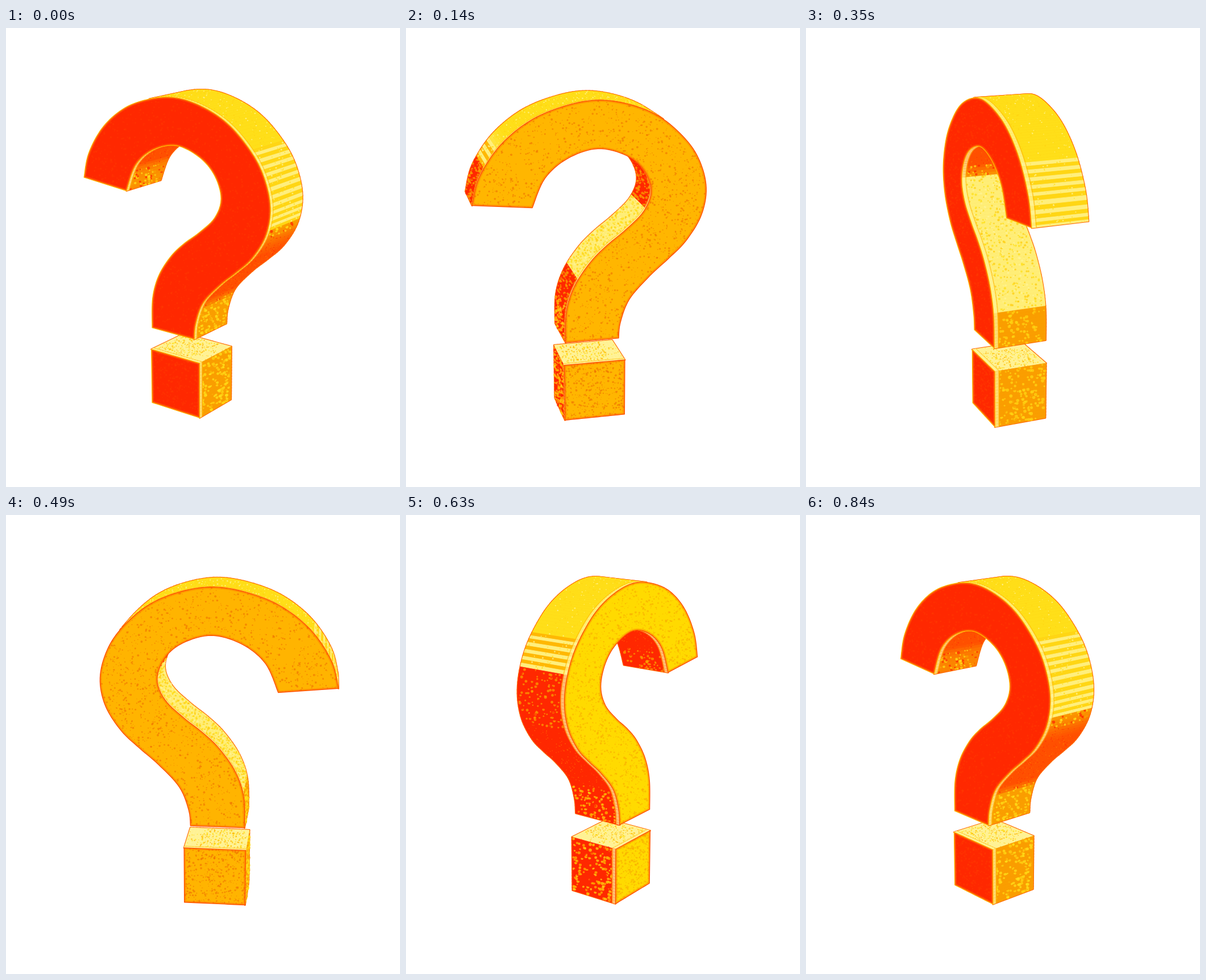
Write an HTML page with a canvas that moves like this. It is 693 px wide and 808 px high and loops after 910 ms.

```html
<!DOCTYPE html>
<html lang="en">
<head>
<meta charset="utf-8">
<title>Turning question mark</title>
<style>
html, body { margin: 0; width: 100%; height: 100%; overflow: hidden; background: #fff; }
canvas { display: block; }
</style>
</head>
<body>
<canvas id="stage" width="693" height="808"></canvas>
<script>
const ctx = document.getElementById('stage').getContext('2d');
const STEP = 70;
// Yaw in degrees for each step of the turn.
const YAWS = [-36.5, -14, 13, 51, 82, 112.5, 142, 174, 203.5, 234, 263.5, 289, 311];

const DIST = 2000, HALF = 48.5, PITCH = 17.5 * Math.PI / 180;
const SP = Math.sin(PITCH), CP = Math.cos(PITCH);

const RED = [255, 40, 0], EMBER = [255, 80, 0], ORANGE = [250, 158, 0], AMBER = [255, 180, 0],
  YELLOW = [255, 223, 25], PALE = [255, 243, 150];

const clamp = (v, lo = 0, hi = 1) => Math.min(hi, Math.max(lo, v));
const mix = (a, b, t) => a.map((v, i) => v + (b[i] - v) * clamp(t));
const css = (c, a = 1) => `rgba(${c.map(Math.round).join()},${a})`;
const rnd = n => { const s = Math.sin(n * 127.1 + 11.7) * 43758.5453; return s - Math.floor(s); };

const OUTER = [[-232, 121], [-219, 167], [-184, 218], [-134, 257], [-77, 279], [-19, 287], [40, 276],
  [92, 251], [138, 208], [162, 166], [171, 122], [162, 77], [136, 35], [105, 5], [72, -24], [36, -64], [20, -106], [17, -135]];
const INNER = [[-78, -135], [-76, -78], [-61, -32], [-33, 9], [-4, 37], [28, 62], [60, 93], [73, 128],
  [60, 165], [29, 192], [-20, 206], [-71, 192], [-110, 160], [-132, 111]];
const BOX = [[-80.5, -283], [-80.5, -177.5], [28.5, -177.5], [28.5, -283]];

function smooth(points, gap = 6) {
  const out = [], at = i => points[clamp(i, 0, points.length - 1)];
  for (let i = 0; i < points.length - 1; i++) {
    const [a, b, c, d] = [at(i - 1), at(i), at(i + 1), at(i + 2)];
    const n = Math.max(1, Math.round(Math.hypot(c[0] - b[0], c[1] - b[1]) / gap));
    for (let j = 0; j < n; j++) {
      const t = j / n;
      out.push([0, 1].map(k => b[k] + t / 2 * (c[k] - a[k] +
        t * (2 * a[k] - 5 * b[k] + 4 * c[k] - d[k] + t * (3 * (b[k] - c[k]) + d[k] - a[k])))));
    }
  }
  out.push(points[points.length - 1]);
  return out;
}

function straight(points, gap = 6) {
  return points.flatMap((p, i) => {
    const q = points[(i + 1) % points.length];
    const n = Math.round(Math.hypot(q[0] - p[0], q[1] - p[1]) / gap);
    return Array.from({ length: n }, (_, j) => [p[0] + (q[0] - p[0]) * j / n, p[1] + (q[1] - p[1]) * j / n]);
  });
}

const hook = smooth(OUTER);
const mark = { outline: [...hook, ...smooth(INNER)], outerCount: hook.length, speckles: 3400, seed: 1 };
const box = { outline: straight(BOX), outerCount: 0, speckles: 420, seed: 9000, isBox: true };

let sinY = 0, cosY = 1;

function turn(x, y, z) {
  return [x * cosY + z * sinY, y, z * cosY - x * sinY];
}
function project(x, y, z) {
  const [px, py, pz] = turn(x, y, z);
  const depth = pz * CP + py * SP, k = DIST / (DIST - depth);
  return [346.5 + px * k, 404 + (pz * SP - py * CP) * k, depth];
}
function trace(points) {
  ctx.beginPath();
  points.forEach(p => ctx.lineTo(p[0], p[1]));
  ctx.closePath();
}
function fillQuad(points, color) {
  trace(points);
  ctx.fillStyle = ctx.strokeStyle = css(color);
  ctx.lineWidth = 0.8;
  ctx.fill();
  ctx.stroke();
}
function dot(p, r, style) {
  ctx.fillStyle = style;
  ctx.beginPath();
  ctx.arc(p[0], p[1], r, 0, 7);
  ctx.fill();
}

// Colour and speckling of a side wall from its turned normal.
function wallLook(shape, wall) {
  const { nx, ny, x, y, i } = wall;
  if (shape.isBox && ny > 0.5) {
    const worn = x > -72 && x < 2;
    return { color: PALE, spots: [AMBER, YELLOW], count: worn ? 18 : 4, size: 1.3 };
  }
  if (shape.isBox || (y < -72 && Math.abs(ny) < 0.4)) {
    const color = mix(RED, ORANGE, (nx + 0.2) / 0.55);
    return { color, spots: [mix(AMBER, YELLOW, 0.7), color, mix(AMBER, YELLOW, nx * 2)], count: 12, size: 2.7 };
  }
  const light = 0.7 * ny + 0.35 * nx;
  if (light > 0.06) {
    if (i >= shape.outerCount) {
      return { color: mix(PALE, YELLOW, 0.25), spots: [YELLOW, PALE, mix(YELLOW, AMBER, 0.4)], count: 13, size: 2 };
    }
    if (y > 85 && y < 215) {
      const groove = mix(YELLOW, AMBER, nx < -0.4 ? 0.9 : 0.2);
      return i % 2 ? { color: groove, spots: [PALE], count: 3, size: 1.4 }
        : { color: mix(PALE, YELLOW, 0.2), spots: [YELLOW], count: 4, size: 1.2 };
    }
    return { color: mix(PALE, YELLOW, light / 0.3), spots: [mix(YELLOW, AMBER, 0.3), PALE], count: 4, size: 1.2 };
  }
  const under = ny < -0.45, away = nx < -0.2;
  return {
    color: away ? RED : mix(EMBER, ORANGE, (light + 0.22) / 0.28),
    spots: under ? [mix(EMBER, AMBER, 0.4), RED] : [away ? ORANGE : YELLOW, ORANGE, RED],
    count: under ? 8 : 10, size: under ? 0.9 : 2.4
  };
}

function visibleWalls(shape) {
  const list = [], pts = shape.outline;
  pts.forEach((p, i) => {
    const q = pts[(i + 1) % pts.length], dx = q[0] - p[0], dy = q[1] - p[1], len = Math.hypot(dx, dy);
    if (len < 0.01) return;
    const x = (p[0] + q[0]) / 2, y = (p[1] + q[1]) / 2;
    const n = turn(-dy / len, dx / len, 0), c = turn(x, y, 0);
    const facing = -n[0] * c[0] + n[1] * (DIST * SP - c[1]) + n[2] * (DIST * CP - c[2]);
    if (facing > 0) list.push({ p, q, x, y, i, nx: n[0], ny: n[1], depth: project(x, y, 0)[2] });
  });
  return list.sort((a, b) => a.depth - b.depth);
}

function strip({ p, q }, z0, z1) {
  return [project(...p, z0), project(...q, z0), project(...q, z1), project(...p, z1)];
}

function drawWall(shape, wall, side) {
  const look = wallLook(shape, wall), { p, q, i } = wall;
  fillQuad(strip(wall, -HALF, HALF), look.color);
  for (let k = 0; k < look.count; k++) {
    const id = shape.seed + i * 31 + k * 3.7, t = 0.2 + 0.6 * rnd(id + 0.3);
    const at = project(p[0] + (q[0] - p[0]) * t, p[1] + (q[1] - p[1]) * t, (rnd(id) * 1.9 - 0.95) * HALF);
    dot(at, look.size * (0.5 + 0.6 * rnd(id + 0.6)), css(look.spots[k % look.spots.length], 0.75));
  }
  if (side) {
    fillQuad(strip(wall, side * HALF, side * HALF * 0.85), mix(look.color, PALE, 0.75));
    fillQuad(strip(wall, side * HALF * 0.85, side * HALF * 0.83), mix(look.color, AMBER, 0.6));
  }
}

function drawFace(shape, face, side) {
  const tilt = sinY * side, red = tilt < -0.25;
  const base = red ? RED : mix(AMBER, [255, 218, 0], (tilt - 0.2) / 0.5);
  const spot = red ? EMBER : mix([238, 112, 0], [248, 172, 0], (tilt - 0.2) / 0.6);
  const span = shape.isBox ? [-81, 110, -284, 107] : [-233, 406, -137, 426];
  ctx.save();
  trace(face);
  ctx.fillStyle = css(base);
  ctx.fill();
  ctx.clip();
  for (let k = 0; k < shape.speckles; k++) {
    const id = shape.seed + k * 1.37;
    const at = project(span[0] + span[1] * rnd(id), span[2] + span[3] * rnd(id + 0.5), side * HALF);
    dot(at, 0.6 + 1.4 * rnd(id + 0.8) ** 2, css(spot, red ? 0.2 : 0.6));
  }
  trace(face);
  ctx.strokeStyle = css(red ? AMBER : EMBER, red ? 0.25 : 0.3);
  ctx.lineWidth = 6;
  ctx.stroke();
  ctx.restore();
  trace(face);
  ctx.strokeStyle = css(red ? AMBER : EMBER);
  ctx.lineWidth = 1.4;
  ctx.stroke();
}

function drawShape(shape) {
  const reach = DIST * CP * cosY;
  const side = reach > HALF ? 1 : reach < -HALF ? -1 : 0;
  const walls = visibleWalls(shape);
  const face = shape.outline.map(p => project(...p, side * HALF));
  ctx.lineJoin = 'round';
  ctx.strokeStyle = css([255, 105, 0]);
  ctx.lineWidth = 3;
  for (const wall of walls) {
    trace(strip(wall, -HALF, HALF));
    ctx.stroke();
  }
  walls.forEach(wall => drawWall(shape, wall, side));
  if (side) drawFace(shape, face, side);
}

function draw(index) {
  const yaw = YAWS[index] * Math.PI / 180;
  sinY = Math.sin(yaw);
  cosY = Math.cos(yaw);
  ctx.fillStyle = '#fff';
  ctx.fillRect(0, 0, 693, 808);
  drawShape(box);
  drawShape(mark);
}

const start = performance.now();
let shown = -1;
function tick() {
  const index = Math.floor((performance.now() - start) / STEP) % YAWS.length;
  if (index !== shown) draw(shown = index);
  requestAnimationFrame(tick);
}
tick();
</script>
</body>
</html>
```
